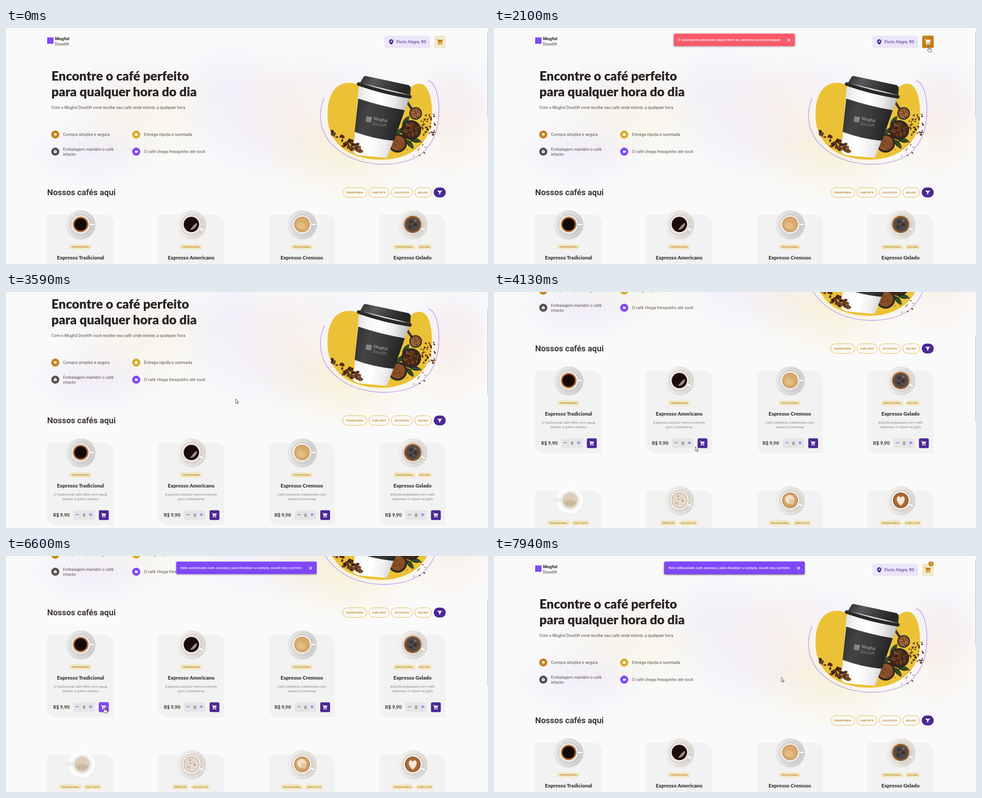
An HTML page for the animation above (8000 ms loop, 1066x525 px).

```html
<!DOCTYPE html>
<html lang="pt-BR">
<head>
<meta charset="utf-8">
<title>Mugful Doorlift</title>
<style>
html, body { margin: 0; width: 100%; height: 100%; overflow: hidden; background: #fafafa; }
svg { display: block; width: 100vw; height: 100vh; }
text { font-family: Roboto, sans-serif; font-size: 9.15px; fill: #574f4d; }
.title { font: 900 28.1px Lato, sans-serif; fill: #272221; }
.name { font: 900 11.3px Lato, sans-serif; fill: #403937; text-anchor: middle; }
.price { font: 900 10.6px Lato, sans-serif; }
.section { font-size: 18.35px; font-weight: 700; fill: #403937; }
.tag { font-size: 5.7px; font-weight: 700; fill: #c47f17; letter-spacing: .38px; text-anchor: middle; }
.filter { letter-spacing: .2px; }
.desc { font-size: 8px; fill: #8d8686; text-anchor: middle; }
.qty { fill: #272221; text-anchor: middle; }
.toast { font-size: 8px; font-weight: 500; letter-spacing: .05px; fill: #fff; }
.brand { font-size: 9.8px; font-weight: 900; fill: #403937; }
.brand2 { font-size: 9.4px; fill: #403937; }
.badge { font-size: 9px; fill: #fff; text-anchor: middle; }
.onCup { fill: #8a8583; }
</style>
</head>
<body>
<svg id="stage" viewBox="0 0 1066 525" preserveAspectRatio="none"></svg>
<script>
const LOOP = 8000;
const PURPLE = '#8047f8', DEEP = '#4b2995', GOLD = '#dbac2c', AMBER = '#c47f17';

let seed = 7;
const random = () => (seed = (seed * 16807) % 2147483647) / 2147483647;

const text = (x, y, cls, str, extra = '') => `<text x="${x}" y="${y}" class="${cls}" ${extra}>${str}</text>`;
const rect = (x, y, w, h, r, fill, extra = '') =>
  `<rect x="${x}" y="${y}" width="${w}" height="${h}" rx="${r}" fill="${fill}" ${extra}/>`;
const circle = (x, y, r, fill, extra = '') => `<circle cx="${x}" cy="${y}" r="${r}" fill="${fill}" ${extra}/>`;
const ellipse = (x, y, rx, ry, fill, turn = 0, extra = '') =>
  `<ellipse rx="${rx}" ry="${ry}" fill="${fill}" transform="translate(${x} ${y}) rotate(${turn})" ${extra}/>`;
const path = (d, fill, extra = '') => `<path d="${d}" fill="${fill}" ${extra}/>`;
const line = (d, color, width, extra = '') => path(d, 'none', `stroke="${color}" stroke-width="${width}" ${extra}`);

// Icons live in a 256 unit box and are centred on x, y.
const ICONS = {
  cart: 'M222 59A8 8 0 0 0 216 56H54.7L49.8 29A16 16 0 0 0 34 16H16a8 8 0 0 0 0 16h18L59.6 172a24 24 0 0 0 5.3 11.3 28 28 0 1 0 44.4 8.4h45.4A28 28 0 0 0 152 204a28 28 0 1 0 28-28H83a8 8 0 0 1-7.9-6.6L72 152h116a24 24 0 0 0 23.6-19.7l12.2-67A8 8 0 0 0 222 59Z',
  pin: 'M128 16a88 88 0 0 0-88 88c0 75 80 132 83.4 134.5a8 8 0 0 0 9.2 0C136 236 216 179 216 104A88 88 0 0 0 128 16Zm0 56a32 32 0 1 1-32 32A32 32 0 0 1 128 72Z',
  funnel: 'M24 40H232Q240 46 234 54L156 140V204L100 236V140L22 54Q16 46 24 40Z',
  timer: 'M96 8h64v16H96ZM128 40a92 92 0 1 0 1 0ZM128 132l46-46 10 10-46 46Z',
  box: 'M128 20L220 70 128 120 36 70ZM28 84L120 134V236L28 186ZM228 84L136 134V236L228 186Z',
  mug: 'M32 88H200a40 40 0 0 1 4 80l-18 30H60Q32 170 32 88ZM80 24h14v48H80ZM112 24h14v48h-14ZM144 24h14v48h-14Z'
};
const icon = (name, x, y, size, fill) =>
  path(ICONS[name], fill, `transform="translate(${x - size / 2} ${y - size / 2}) scale(${size / 256})"`);

const fade = (id, color) => `<radialGradient id="${id}"><stop stop-color="${color}"/>
  <stop offset=".5" stop-color="${color}" stop-opacity=".5"/><stop offset="1" stop-color="${color}" stop-opacity="0"/></radialGradient>`;
const linear = (id, ...stops) => `<linearGradient id="${id}" gradientTransform="rotate(14)">` +
  stops.map((c, i) => `<stop offset="${i / (stops.length - 1)}" stop-color="${c}"/>`).join('') + '</linearGradient>';

const defs = `<defs>
  ${fade('lilac', '#a88af0')}${fade('yellow', '#f0d878')}${fade('peach', '#f3cfae')}
  ${linear('grey', '#ececec', '#cfcfcf')}${linear('ivory', '#f5f2ef', '#ddd8d2')}
  ${linear('paper', '#d2d2d2', '#f6f6f6', '#ffffff', '#ececec', '#bdbdbd')}
  ${linear('sleeve', '#2c2c2c', '#454444', '#3a3a3a', '#262626')}
  ${linear('lid', '#2e2e2e', '#5a5a5a', '#3c3c3c', '#272727')}
  <filter id="shadow" x="-10%" y="-60%" width="120%" height="240%">
    <feDropShadow dx="0" dy="1.2" stdDeviation="1.7" flood-opacity=".4"/></filter>
</defs>`;

function backdrop() {
  const blot = (x, y, rx, ry, color, alpha) => ellipse(x, y, rx, ry, `url(#${color})`, 0, `opacity="${alpha}"`);
  return blot(230, 130, 180, 90, 'lilac', .06) + blot(310, 190, 190, 130, 'yellow', .13) +
    blot(190, 275, 170, 90, 'lilac', .11) + blot(500, 140, 160, 130, 'lilac', .1) +
    blot(640, 180, 150, 130, 'peach', .2) + blot(560, 260, 190, 100, 'lilac', .07) +
    blot(750, 280, 190, 110, 'yellow', .24) + blot(740, 110, 170, 80, 'lilac', .05) +
    blot(980, 220, 110, 140, 'peach', .22) + blot(990, 140, 120, 110, 'lilac', .07);
}

function header() {
  return rect(91, 21, 14, 14, 0, PURPLE) +
    text(108.5, 27.3, 'brand', 'Mugful') + text(108.5, 38.6, 'brand2', 'Doorlift') +
    rect(836.7, 17, 101.3, 27.6, 3.4, '#ebe5f9') + icon('pin', 852, 31, 13.6, DEEP) +
    text(863.7, 34.3, '', 'Porto Alegre, RS', `style="fill:${DEEP}"`) +
    rect(947, 17, 25.5, 27.6, 3.4, '#f1e9c9') + icon('cart', 959.8, 30.7, 15.4, AMBER) +
    `<g id="cartHover">${rect(947, 17, 25.5, 27.6, 3.4, AMBER)}${icon('cart', 959.8, 30.7, 15.4, '#fff')}</g>` +
    `<g id="badge">${circle(966.6, 17.2, 5.8, AMBER)}${text(966.6, 20.4, 'badge', '3', 'id="badgeCount"')}</g>`;
}

function benefits() {
  const item = (x, y, color, name, ...lines) => circle(x, y, 9, color) + icon(name, x, y, 9, '#fff') +
    lines.map((str, i) => text(x + 17, y + 3.3 + (i - (lines.length - 1) / 2) * 10.9, '', str)).join('');
  return item(109, 237, AMBER, 'cart', 'Compra simples e segura') +
    item(288, 237, GOLD, 'timer', 'Entrega rápida e rastreada') +
    item(109, 275, '#574f4d', 'box', 'Embalagem mantém o café', 'intacto') +
    item(288, 275, PURPLE, 'mug', 'O café chega fresquinho até você');
}

const bean = (x, y, size, turn) =>
  ellipse(x, y, size, size * .66, ['#4a2814', '#6b3d1f', '#8d5a34'][random() * 3 | 0], turn) +
  ellipse(x, y, size * .85, size * .13, '#2a140a', turn + 8);

function beans(count, size, place) {
  let out = '';
  for (let i = 0; i < count; i++) {
    const [x, y] = place(random(), random());
    out += bean(x, y, size * (.7 + random() * .5), random() * 180);
  }
  return out;
}
const inDisc = (cx, cy, r) => (a, b) =>
  [cx + r * Math.sqrt(a) * Math.cos(b * 6.283), cy + r * Math.sqrt(a) * Math.sin(b * 6.283)];

function heroPicture() {
  const leaf = (x, y, turn) => `<g transform="translate(${x} ${y}) rotate(${turn})">` +
    path('M-14 0Q0 -10 14 0Q0 10 -14 0Z', '#27401f') + line('M-14 0H14', '#6f8a4f', .7) + '</g>';
  const bowl = (x, y, r, fill) => circle(x, y, r, '#211b18') +
    circle(x, y, r * .9, 'none', 'stroke="#5c524b" stroke-width=".8"') + circle(x, y, r * .8, fill);
  const crumbs = (x, y, r) => beans(30, 1.2, inDisc(x, y, r));
  const round = 'stroke-linecap="round"';
  return path('M711 192C711 150 727 122 759 122C795 122 812 165 850 165C880 165 888 124 914 124C936 124 943 160 942 196C941 255 895 293 830 293C765 293 711 262 711 192Z', '#ebc136') +
    line('M704 154C686 200 696 245 740 275C785 309 870 313 914 283C950 257 960 215 957 168C955 140 946 120 933.5 117', '#b697f3', 1.4) +
    beans(48, 2.3, (a, b) => [912 + a * 38, 186 + b * 52]) + beans(14, 1.6, (a, b) => [878 + a * 50, 250 + b * 35]) +
    line('M884 160L900 184', '#29231f', 5, round) + line('M885 161L896 177', '#8f8780', 1, round) +
    leaf(884, 207, -55) + leaf(893, 258, 50) + leaf(874, 228, -30) + leaf(905, 250, 10) +
    bowl(906, 190, 14, '#a4673a') + crumbs(906, 190, 9) +
    bowl(896, 227, 22, '#4b2a17') + beans(46, 3.2, inDisc(896, 227, 16)) +
    bowl(866, 256, 21, '#8a5026') + crumbs(866, 256, 15) +
    path('M780 130L893 154L844 285Q842 289 836 288.5L780 283Q768 280 768 274Z', 'url(#paper)') +
    path('M779 157Q830 174 882 183L858 251Q810 246 771 231Z', 'url(#sleeve)') +
    path('M790 110Q792 106 797 107L890 127Q895 129 895 134L894 149L783 122Z', 'url(#lid)') +
    line('M780 124.5Q835 144 893 153', '#262626', 8, round) +
    line('M781 123Q836 141 893 150', '#4d4d4d', 1.3, round) +
    `<g transform="translate(796 205) rotate(11)">${rect(0, -9, 12, 12, 0, '#8a8583')}` +
    text(16, -4, 'brand onCup', 'Mugful') + text(16, 7, 'brand2 onCup', 'Doorlift') + '</g>' +
    beans(34, 4.7, (a, b) => [719 + a * 68, 231 + a * 38 + (b - .3) * 24 * Math.sin(.6 + a * 2.1)]);
}

function hero() {
  return text(100.5, 116.6, 'title', 'Encontre o café perfeito') +
    text(100.5, 152.1, 'title', 'para qualquer hora do dia') +
    text(100.3, 180, '', 'Com o Mugful Doorlift você recebe seu café onde estiver, a qualquer hora') +
    benefits() + heroPicture();
}

function filters() {
  const pill = (x, w, label) => rect(x, 355.1, w, 21.4, 10.7, 'none', `stroke="${GOLD}" stroke-width=".9"`) +
    text(x + w / 2, 367.7, 'tag filter', label);
  return text(91, 372.2, 'section', 'Nossos cafés aqui') +
    pill(744.8, 53, 'TRADICIONAL') + pill(802.7, 44.5, 'COM LEITE') +
    pill(852.2, 46.6, 'ALCOÓLICO') + pill(903.9, 37.4, 'GELADO') +
    rect(946, 354.8, 26.5, 22, 11, DEEP) + icon('funnel', 959.3, 366, 11.5, '#fff');
}

const COFFEES = [
  { name: 'Expresso Tradicional', tags: ['TRADICIONAL'], lines: ['O tradicional café feito com água', 'quente e grãos moídos'],
    saucer: 'grey', rim: '#b4703a', fill: '#140a07', r: 13.8, handle: 0 },
  { name: 'Expresso Americano', tags: ['TRADICIONAL'], lines: ['Expresso diluído, menos intenso', 'que o tradicional'],
    saucer: 'ivory', rim: '#4a2a20', fill: '#1a0c0a', r: 15.8, handle: 25, extra: path('M-3 12Q10 12 13 -3Q8 -4 -3 12Z', '#968e89') },
  { name: 'Expresso Cremoso', tags: ['TRADICIONAL'], lines: ['Café expresso tradicional com', 'espuma cremosa'],
    saucer: 'grey', rim: '#c08d4e', fill: '#d9ab6b', r: 15.8, handle: 0, extra: ellipse(-2, 3, 10, 7, '#e3bd84', 20) },
  { name: 'Expresso Gelado', tags: ['TRADICIONAL', 'GELADO'], lines: ['Bebida preparada com café', 'expresso e cubos de gelo'],
    saucer: 'ivory', rim: '#9a5f2d', rimR: 19.3, fill: '#504a48', r: 15.5, handle: 25,
    extra: rect(-7, -9, 7, 6, 1, '#383130') + rect(2, -3, 7, 7, 1, '#393230') + rect(-8, 3, 6, 6, 1, '#37302e') + circle(6, -9, 2.5, '#77706c') },
  { tags: ['TRADICIONAL', 'COM LEITE'], saucer: 'white', rim: '#d8c8b4', fill: '#dccdbb', r: 17, handle: 180, extra: ellipse(0, 6, 13, 7, '#cdb9a0') },
  { tags: ['ESPECIAL', 'ALCOÓLICO'], saucer: 'ivory', rim: '#c9ab92', fill: '#e8dbcf', r: 15.5, handle: 25, specks: true },
  { tags: ['TRADICIONAL', 'COM LEITE'], saucer: 'ivory', rim: '#b87a3c', fill: '#d4a468', r: 15.5, handle: 25, extra: circle(-1, -2, 10, '#f0dfc8') + circle(3, 3, 6, '#e3c8a2') },
  { tags: ['TRADICIONAL', 'COM LEITE'], saucer: 'ivory', rim: '#8d4f22', fill: '#ab6a33', r: 15.5, handle: 25,
    extra: path('M0 12C-12 2 -10 -9 -4 -9Q-1 -9 0 -5Q1 -9 4 -9C10 -9 12 2 0 12Z', '#f3e6d4') }
];

function cup({ saucer, rim, rimR = 17.3, fill, r, handle, extra = '', specks }) {
  const glass = saucer === 'white';
  const plate = glass
    ? circle(2, -1, 29, '#fdfdfd')
    : circle(0, 0, 32.6, `url(#${saucer})`) + circle(0, 0, 23, 'none', 'stroke="#b9b4b0" stroke-width="2" opacity=".4"');
  let dots = '';
  if (specks) for (let i = 0; i < 24; i++) {
    const [x, y] = inDisc(0, 0, 11)(random(), random());
    dots += circle(x, y, .35 + random() * .6, '#6b4a38');
  }
  const arm = (color, width) => line('M18 0H29', color, width, `stroke-linecap="round" transform="rotate(${handle})"`);
  return plate + `<g transform="translate(${glass ? 3 : 0} -1)">${arm('#b5b2af', 5.6)}${arm('#fafafa', 4.2)}` +
    circle(0, 0, 20.5, '#f6f4f2', 'stroke="#cfcbc8" stroke-width=".8"') +
    circle(0, 0, rimR, rim) + circle(0, 0, r, fill) + extra + dots + '</g>';
}

const TAG_WIDTHS = { TRADICIONAL: 50, 'COM LEITE': 40, 'ALCOÓLICO': 43, ESPECIAL: 37, GELADO: 33 };

function tagRow(tags) {
  const gap = 4;
  const total = tags.reduce((sum, tag) => sum + TAG_WIDTHS[tag] + gap, -gap);
  let x = 73.5 - total / 2;
  return tags.map(tag => {
    const w = TAG_WIDTHS[tag];
    const out = rect(x, 66, w, 12, 6, '#f1e9c9') + text(x + w / 2 + .2, 74.1, 'tag', tag);
    x += w + gap;
    return out;
  }).join('');
}

function details({ name, lines }, i) {
  return text(73.5, 100, 'name', name) +
    lines.map((str, k) => text(73.5, 117.9 + k * 9.9, 'desc', str)).join('') +
    text(13, 164.8, 'price', 'R$ 9,90', `id="price${i}"`) +
    `<g id="buy${i}">${rect(57.8, 151, 47.6, 20.4, 3.4, '#e6e5e5')}` +
    line('M63.2 160.4H70.4M92.4 160.4H99.6M96 156.8V164', PURPLE, 1.2) +
    text(81.6, 164.5, 'qty', '0', `id="qty${i}"`) +
    rect(114.2, 150.5, 21.8, 21.8, 3.4, DEEP) + rect(114.2, 150.5, 21.8, 21.8, 3.4, PURPLE, `id="hover${i}" opacity="0"`) +
    icon('cart', 125, 161.4, 12.6, '#fff') + '</g>';
}

function card(coffee, i) {
  const x = 91.2 + (i % 4) * 244.8, y = 415 + (i > 3 ? 266.5 : 0);
  return `<g transform="translate(${x} ${y})">` +
    path('M3.4 0H126.5A20.5 20.5 0 0 1 147 20.5V180.6A3.4 3.4 0 0 1 143.6 184H20.5A20.5 20.5 0 0 1 0 163.5V3.4A3.4 3.4 0 0 1 3.4 0Z', '#f3f2f2') +
    `<g transform="translate(74 23)">${cup(coffee)}</g>${tagRow(coffee.tags)}${coffee.name ? details(coffee, i) : ''}</g>`;
}

function toast(id, x, w, color, message) {
  const cx = x + w - 13.5;
  return `<g id="${id}">${rect(x, 12.5, w, 27.8, 2.3, color, 'filter="url(#shadow)"')}` +
    text(x + 9.4, 28.8, 'toast', message) + line(`M${cx - 3} 24l6 6m0-6l-6 6`, '#fff', 1.2) + '</g>';
}

const ADDED = 'Item adicionado com sucesso, para finalizar a compra, vá até seu carrinho';
const OUTLINE = 'stroke="#222" stroke-width=".8" stroke-linejoin="round"';
document.getElementById('stage').innerHTML = defs + rect(0, 0, 1066, 525, 0, '#fafafa') +
  `<g id="page">${backdrop()}${header()}${hero()}${filters()}${COFFEES.map(card).join('')}</g>` +
  rect(1064.8, 8, 1.2, 192, 0, '#c4c4c4', 'id="thumb"') +
  toast('warning', 397.5, 268, '#fa5a6b', 'É necessário adicionar algum item ao carrinho para prosseguir') +
  toast('added1', 376.5, 310.5, PURPLE, ADDED) + toast('added2', 376.5, 310.5, PURPLE, ADDED) +
  `<g id="cursor"><g id="arrow">${path('M0 0V9.5L2.2 7.5L3.8 11L5.4 10.3L3.9 6.9H6.8Z', '#fff', OUTLINE)}</g>
  <g id="hand">${path('M1 .8Q2 -.8 3 .8V5L7.2 6Q8.3 6.5 8 8L7.3 12H1.2L-1.6 7.6Q-1.4 5.9 1 7.6Z', '#fff', OUTLINE)}
  ${line('M3.6 5V7.5M5.4 5.5V7.5', '#222', .6)}</g></g>`;

const el = id => document.getElementById(id);
const set = (id, name, value) => el(id).setAttribute(name, value);
const ramp = (t, a, b) => Math.min(1, Math.max(0, (t - a) / (b - a)));
const smooth = p => p * p * (3 - 2 * p);
const latest = (t, steps) => steps.reduce((value, [at, next]) => t >= at ? next : value, 0);

const ROUTE = [
  [260, 1035, 478], [480, 930, 320], [680, 850, 180], [820, 846, 100], [1060, 981, 33], [1140, 978, 33], [1350, 963, 36],
  [1700, 960, 41], [2100, 960, 41], [2320, 850, 48], [2630, 627, 31], [2700, 630, 31], [3080, 652, 27], [3260, 652, 27],
  [3500, 508, 238], [3640, 508, 238], [4060, 446, 343], [4130, 445, 344], [4320, 432, 334], [4740, 432, 334],
  [4950, 460, 337], [5270, 460, 338], [5450, 235, 353], [5600, 198, 346], [5920, 196, 340], [6130, 190, 337],
  [6200, 187, 335], [6330, 187, 335], [6460, 216, 337], [6620, 216, 337], [6930, 586, 240], [7590, 586, 240],
  [7660, 633, 269], [7900, 633, 269], [7940, 635.5, 270]
];
const HAND_SPANS = [[1200, 2180], [2640, 3300], [4230, 5310], [6100, 6680]];
const SCROLL = [[3480, 80], [3730, 160], [3900, 240], [6990, 160], [7130, 0]];

function cursorAt(t) {
  const next = ROUTE.findIndex(stop => stop[0] > t);
  if (next < 1) return ROUTE[next < 0 ? ROUTE.length - 1 : 0].slice(1);
  const [a, ax, ay] = ROUTE[next - 1], [b, bx, by] = ROUTE[next];
  const p = smooth(ramp(t, a, b));
  return [ax + (bx - ax) * p, ay + (by - ay) * p];
}

function showToast(id, x, shown) {
  const scale = .75 + .25 * shown;
  set(id, 'opacity', shown);
  set(id, 'transform', `translate(${x} 26.4) scale(${scale} ${scale * scale}) translate(${-x} -26.4)`);
}

function setQuantity(i, quantity) {
  const wide = quantity > 1;
  el('qty' + i).textContent = quantity;
  el('price' + i).textContent = 'R$ ' + (9.9 * Math.max(1, quantity)).toFixed(2).replace('.', ',');
  set('price' + i, 'x', wide ? 10 : 13);
  set('buy' + i, 'transform', `translate(${wide ? 3 : 0} 0)`);
}

function draw(t) {
  const scroll = latest(t, SCROLL);
  set('page', 'transform', `translate(0 ${-scroll})`);
  set('thumb', 'y', 8 + scroll * .37);

  showToast('warning', 531.5, smooth(ramp(t, 1830, 2020)) * (1 - smooth(ramp(t, 3250, 3420))));
  showToast('added1', 531.7, smooth(ramp(t, 5290, 5440)));
  showToast('added2', 531.7, smooth(ramp(t, 6560, 6720)));

  set('cartHover', 'opacity', ramp(t, 1140, 1320) - ramp(t, 2180, 2380));
  setQuantity(0, latest(t, [[6250, 1], [6540, 0]]));
  setQuantity(1, latest(t, [[4460, 1], [4640, 2], [5230, 0]]));
  set('hover0', 'opacity', ramp(t, 6400, 6550) - ramp(t, 6650, 7110));
  set('hover1', 'opacity', ramp(t, 4850, 5050) - ramp(t, 5310, 5610));
  set('badge', 'opacity', t >= 5230 ? 1 : 0);
  el('badgeCount').textContent = t >= 6540 ? 3 : 2;

  const [x, y] = cursorAt(t);
  const hand = HAND_SPANS.some(([a, b]) => t >= a && t < b);
  set('cursor', 'transform', `translate(${x} ${y})`);
  set('cursor', 'opacity', t >= 260 ? 1 : 0);
  set('arrow', 'opacity', hand ? 0 : 1);
  set('hand', 'opacity', hand ? 1 : 0);
}

const start = performance.now();
function tick() {
  draw((performance.now() - start) % LOOP);
  requestAnimationFrame(tick);
}
tick();
</script>
</body>
</html>
```
